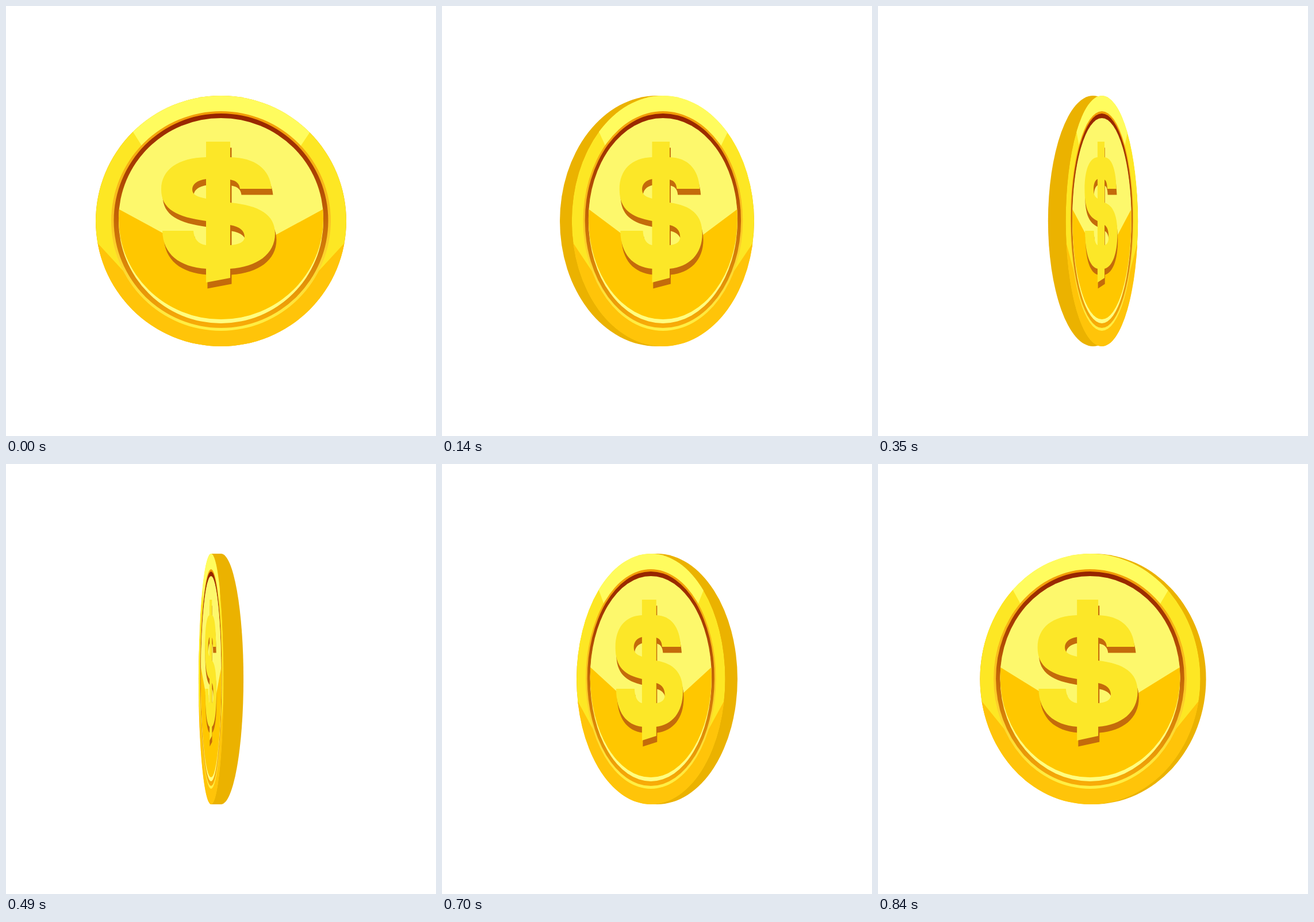
An HTML page that plays this animation: 748x748 px, repeating every 910 ms.

```html
<!DOCTYPE html>
<html>
<head>
<meta charset="utf-8">
<style>
html, body { margin: 0; width: 100%; height: 100%; overflow: hidden; background: #fff; }
svg { display: block; width: 100vw; height: 100vh; }
</style>
</head>
<body>
<svg viewBox="0 0 748 748">
  <defs>
    <linearGradient id="lip" x2="0" y2="1">
      <stop stop-color="#f29a05"/><stop offset=".5" stop-color="#fbc522"/><stop offset="1" stop-color="#fff045"/>
    </linearGradient>
    <linearGradient id="groove" x2="0" y2="1">
      <stop stop-color="#962400"/><stop offset=".25" stop-color="#a83c02"/>
      <stop offset=".55" stop-color="#ca7008"/><stop offset="1" stop-color="#f9ad08"/>
    </linearGradient>
    <clipPath id="rimClip"><circle cx="374" cy="374" r="218"/></clipPath>
    <clipPath id="dishClip"><ellipse cx="374" cy="370" rx="178" ry="175"/></clipPath>
    <path id="dollar" d="M348 236H390V263C433 264 459 283 462 318H407C406 309 401 304 390 302V342
      C441 347 468 363 468 396C468 432 436 454 390 457V473L348 481V457C302 454 273 432 272 391H326
      C327 405 334 414 348 416V374C298 367 270 354 270 319C270 284 300 264 348 263Z
      M348 301C332 303 324 310 324 319C324 328 332 332 348 335Z
      M390 381V416C406 415 415 410 415 402C415 391 407 384 390 381Z"/>
  </defs>
  <g fill="#ebb200">
    <ellipse id="edge" cx="374" cy="374" ry="218"/>
    <rect id="bridge" y="156" height="436"/>
  </g>
  <g id="face">
    <g clip-path="url(#rimClip)">
      <circle cx="374" cy="374" r="218" fill="#fde724"/>
      <path fill="#fffc5e" d="M221 219L248 262H500L529 219V150H221Z"/>
      <path fill="#ffc409" d="M158 411L240 500H508L590 411L600 600H150Z"/>
    </g>
    <circle cx="374" cy="374" r="191" fill="url(#lip)"/>
    <circle cx="374" cy="373.5" r="186.5" fill="url(#groove)"/>
    <circle cx="374" cy="374" r="178" fill="#fffe80"/>
    <g clip-path="url(#dishClip)">
      <path fill="#fdf86c" d="M190 190H558V550H190Z"/>
      <path fill="#ffc700" d="M190 350L374 450L558 350V550H190Z"/>
    </g>
    <use href="#dollar" x="2.5" y="10.5" fill="#c46b0b"/>
    <use href="#dollar" fill="#fce728"/>
  </g>
</svg>
<script>
const STEP = 70, COUNT = 13, CENTER = 374, RADIUS = 218;
// [horizontal scale, sideways shift] for the first half turn; the second half mirrors it
const poses = [[1, 0], [.879, 5], [.7275, 10.4], [.593, 10.7], [.456, 10.8], [.288, 15.4], [.1, 17.3]];
const el = id => document.getElementById(id);
const set = (id, attrs) => {
  for (const name in attrs) el(id).setAttribute(name, attrs[name]);
};

function draw(now) {
  const step = Math.floor(now / STEP) % COUNT;
  const firstHalf = step < poses.length;
  const index = firstHalf ? step : COUNT - step;
  const [scale, shift] = poses[index];
  const faceX = CENTER + (firstHalf ? shift : -shift);
  const edgeOn = index === poses.length - 1;
  set('edge', { rx: RADIUS * scale + shift });
  set('bridge', { x: Math.min(faceX, CENTER), width: edgeOn ? shift : 0 });
  set('face', { transform: `translate(${faceX} 0) scale(${scale} 1) translate(${-CENTER} 0)` });
}

const start = performance.now();
function loop() {
  draw(performance.now() - start);
  requestAnimationFrame(loop);
}
loop();
</script>
</body>
</html>
```
